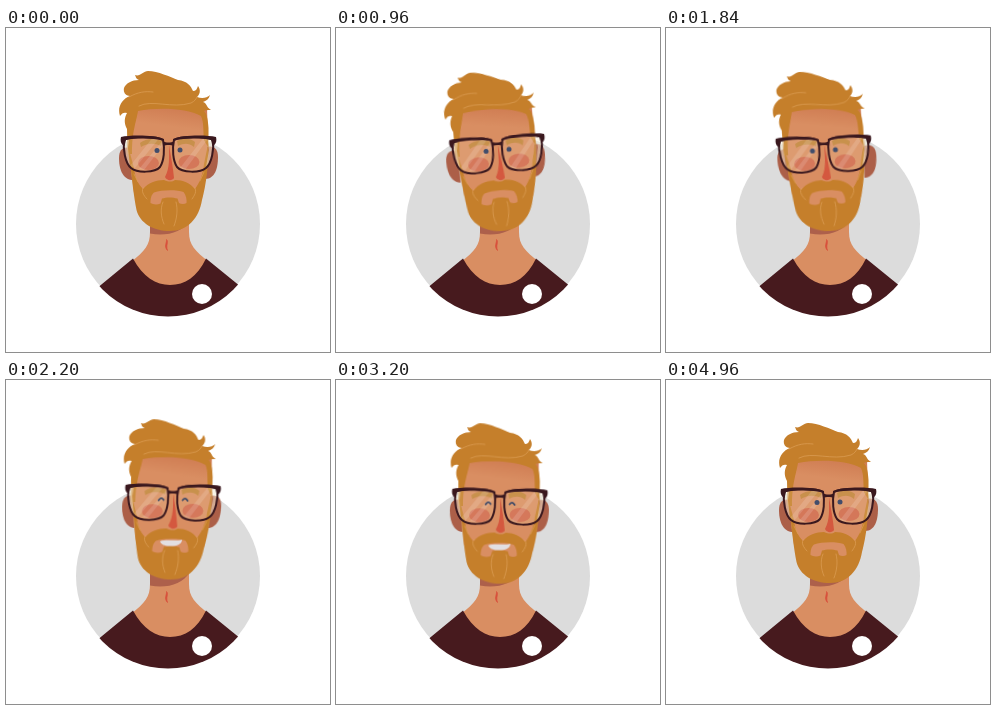
An HTML page that plays this animation: 324 by 324 pixels, repeating every 5000 ms.

```html
<!DOCTYPE html>
<html lang="en">
<head>
<meta charset="utf-8">
<title>Bearded man portrait</title>
<style>
html, body { margin: 0; width: 100%; height: 100%; overflow: hidden; background: #fff; }
svg { display: block; width: 100vw; height: 100vh; }
.skin { fill: #d98e62; }
.hair { fill: #c57f2b; }
.dark { fill: #3a181e; }
.strand { fill: none; stroke: #dda058; stroke-width: .7; stroke-linecap: round; }
.rim { fill: none; stroke: #3a181e; stroke-width: 2; stroke-linejoin: round; }
.happy { fill: none; stroke: #3f4a66; stroke-width: 1.8; stroke-linecap: round; }

.head, .face, .ears, .eyes, .happy, .smile { animation: 5s ease-in-out infinite; }
.head { transform-origin: 163px 195px; animation-name: head; }
.face { animation-name: face; }
.ears { animation-name: ears; }
.eyes { transform-origin: 163px 122px; animation-name: eyes; }
.happy { animation-name: happy; }
.smile { transform-origin: 163px 166px; animation-name: smile; }

@keyframes head {
  0%, 4.5%  { transform: translate(0, 0) rotate(0deg) skewX(0deg); }
  17%       { transform: translate(2.5px, 0) rotate(-3.8deg) skewX(0deg); }
  23%       { transform: translate(2.5px, 0) rotate(-4.1deg) skewX(0deg); }
  33%       { transform: translate(0, 0) rotate(-2deg) skewX(1.2deg); }
  37.2%     { transform: translate(0, 0) rotate(-2deg) skewX(1.2deg); }
  44%       { transform: translate(1px, -3.5px) rotate(.8deg) skewX(-1.1deg); }
  46.5%     { transform: translate(1px, -3.5px) rotate(.8deg) skewX(-1.1deg); }
  54.5%     { transform: translate(-.5px, 3px) rotate(4.3deg) skewX(0deg); }
  57.5%     { transform: translate(-.5px, 3px) rotate(4.3deg) skewX(0deg); }
  67%, 100% { transform: translate(0, 0) rotate(0deg) skewX(0deg); }
}
@keyframes face {
  0%, 4.5%, 67%, 100% { transform: translateX(0); }
  17%, 23%  { transform: translateX(1.5px); }
  33%, 37%  { transform: translateX(-.5px); }
  44%, 58%  { transform: translateX(.8px); }
}
@keyframes ears {
  0%, 4.5%, 44%, 100% { transform: translateX(0); }
  17%, 23%  { transform: translateX(-1px); }
  33%, 37%  { transform: translateX(2px); }
}
@keyframes eyes {
  0%, 38%, 86%, 100% { transform: scaleY(1); opacity: 1; }
  40.5%, 83.5% { transform: scaleY(.35); opacity: 1; }
  40.6%, 83.4% { transform: scaleY(.35); opacity: 0; }
}
@keyframes happy {
  0%, 40.5%, 83.5%, 100% { opacity: 0; }
  40.6%, 83.4% { opacity: 1; }
}
@keyframes smile {
  0%, 38%, 100% { transform: scale(.4, 0); }
  43%, 81% { transform: scale(1); }
  86% { transform: scale(.4, 0); }
}
</style>
</head>
<body>
<svg viewBox="0 0 324 324">
  <defs>
    <clipPath id="disc"><circle cx="162" cy="196" r="92.600"/></clipPath>
    <clipPath id="lenses">
      <path id="lensL" d="M118 112C125 108 151 108 157 112C159 121 158 133 154 139C149 145 131 145 125 140C119 135 117 121 118 112Z"/>
      <path id="lensR" d="M207 112C200 108 174 108 168 112C166 121 167 133 171 139C176 145 194 145 200 140C206 135 208 121 207 112Z"/>
    </clipPath>
    <linearGradient id="brow" x1=".7" x2=".6" y2="1">
      <stop offset="0" stop-color="#cf7c52"/>
      <stop offset=".2" stop-color="#d98e62"/>
    </linearGradient>
  </defs>

  <circle cx="162" cy="196" r="92" fill="#dcdcdc"/>

  <!-- body -->
  <path class="skin" d="M144 180V204C144 217 139 223 125 234L142 264H186L203 234C189 223 183 217 183 204V180Z"/>
  <path d="M144 180H183V193C177 204 160 209 144 205.500Z" fill="#ad604b"/>
  <path d="M160.5 211.5C163 214 159.5 217 161.5 222.5C157.500 218 161 215 160.500 211.500Z" fill="#d8503c" stroke="#d8503c" stroke-width=".7"/>
  <path clip-path="url(#disc)" fill="#471a1e" d="M58 289L93 258.500L127 230.500C137 249 150 257 164 257C179 257 191 249 200 230.500L232 256.500L267 289Z"/>
  <circle cx="196" cy="266" r="10" fill="#fff"/>

  <g class="head">
    <g class="ears" fill="#ac5f48">
      <path d="M125 120C117 118 113 122 113 130C113 140 116 151 126 152Z"/>
      <path d="M200 119C208 117 212 121 212 129C212 140 209 151 199 151Z"/>
    </g>

    <path fill="url(#brow)" d="M122 80H201L202 110L200 148L196 170L164 180L128 165L122 118Z"/>

    <!-- hair -->
    <path class="hair" d="M121.500 126L121 101C118 96 118 90 121 85C118 84 116 85 114 88C111 79 116 71 124 68C120 68 117 65 118 60C120 55 126 52 133 52C130 51 130 49 129 47C134 49 137 43 142 43C152 43 164 49 172 52C181 53 185 58 187 63C190 63 191 61 192 58C195 62 194 66 191 69C196 71 201 70 204 67C203 71 200 73 197 74C201 75 200 79 205 82C201 82 199 82 198 83C201 86 202 92 202.500 100V120L198 112C197 101 198 95 195 88C181 80 152 79 132 83C130 95 126 103 126 126Z"/>
    <path class="strand" d="M133 78C146 71 166 81 185 75C189 73 190 71 191 69M123 69C132 64 139 63 147 64"/>

    <g class="face">
      <!-- cheeks, brows, nose -->
      <g fill="#cd5c44" opacity=".82">
        <ellipse cx="142.500" cy="135" rx="10.500" ry="7"/>
        <ellipse cx="183" cy="134" rx="10.500" ry="7"/>
      </g>
      <path fill="#c08238" d="M134 115C140 110 149 110 156 113L155 118C148 115 142 115 135 119ZM171 113C178 109 184 110 189 114L188 119C183 115 178 115 172 118Z"/>
      <path fill="#d4583f" d="M163 117C163 130 164 140 159 149C161 153 166 153 168 150C167 139 165 129 163 117Z"/>
    </g>

    <!-- beard -->
    <path class="hair" d="M121.500 116L128 140C129 150 132 156 137 161C142 155 150 152 158 152C163 154 166 154 169 152C177 152 184 155 189 161C194 154 197 146 198 136L202.500 114C203 135 200 158 196 172C193 190 182 203 164 203C147 203 134 195 130.500 182C128 169 126 152 125 142C123 132 121.500 124 121.500 116Z"/>
    <path class="skin" d="M148 164.500C156 161.500 171 161.500 177.500 164C180 167 181 172 180.500 175C178 176.500 175 176 173 175L171.500 170.500C167 169 160 169 156 170.500L154.500 175.500C151 177 147 176.500 144.500 175C144.500 171 145 167 148 164.500Z"/>
    <path class="smile" fill="#e2dfe2" d="M152 165C158 162.500 167 165 174 163C174 168 168 170 161 169.500C157 169.500 153 168 152 165Z"/>
    <path class="strand" d="M157 174C154 181 155 189 158 196M170 174C172 182 171 190 168 198M138 159C134 162 138 168 141 171M188 159C192 163 188 168 186 171M128 146L132 154M198 144L194 153"/>

    <!-- eyes and glasses -->
    <g class="face">
      <g clip-path="url(#lenses)">
        <path fill="#f6e6c8" opacity=".14" d="M114 105H212V146H114Z"/>
        <path fill="#f3ead8" opacity=".45" d="M116 106H124L122 120L124 139L118 134ZM209 106H201L203 122L200 139L207 132Z"/>
        <path fill="#fff" opacity=".14" d="M124 138L148 108H155L129 140ZM133 141L158 111V116L138 142ZM174 140L199 108H204L179 142Z"/>
      </g>
      <g class="eyes" fill="#414d6b">
        <circle cx="151" cy="122.500" r="2.500"/>
        <circle cx="174" cy="122" r="2.500"/>
      </g>
      <path class="happy" d="M148.500 124Q151 120 153.500 123.500M172.500 123.500Q175 120 177.500 124"/>
      <use href="#lensL" class="rim"/>
      <use href="#lensR" class="rim"/>
      <path class="dark" d="M157 113C160 115 165 115 168 113V118C165 116.500 160 116.500 157 118Z"/>
      <path class="dark" d="M115 109C125 106.500 150 107 158 111V113C147 110 130 110 120 112L118.500 118C115 117 114 113 115 109ZM210 109C200 106.500 175 107 167 111V113C178 110 195 110 205 112L206.500 118C210 117 211 113 210 109Z"/>
    </g>
  </g>
</svg>
</body>
</html>
```
